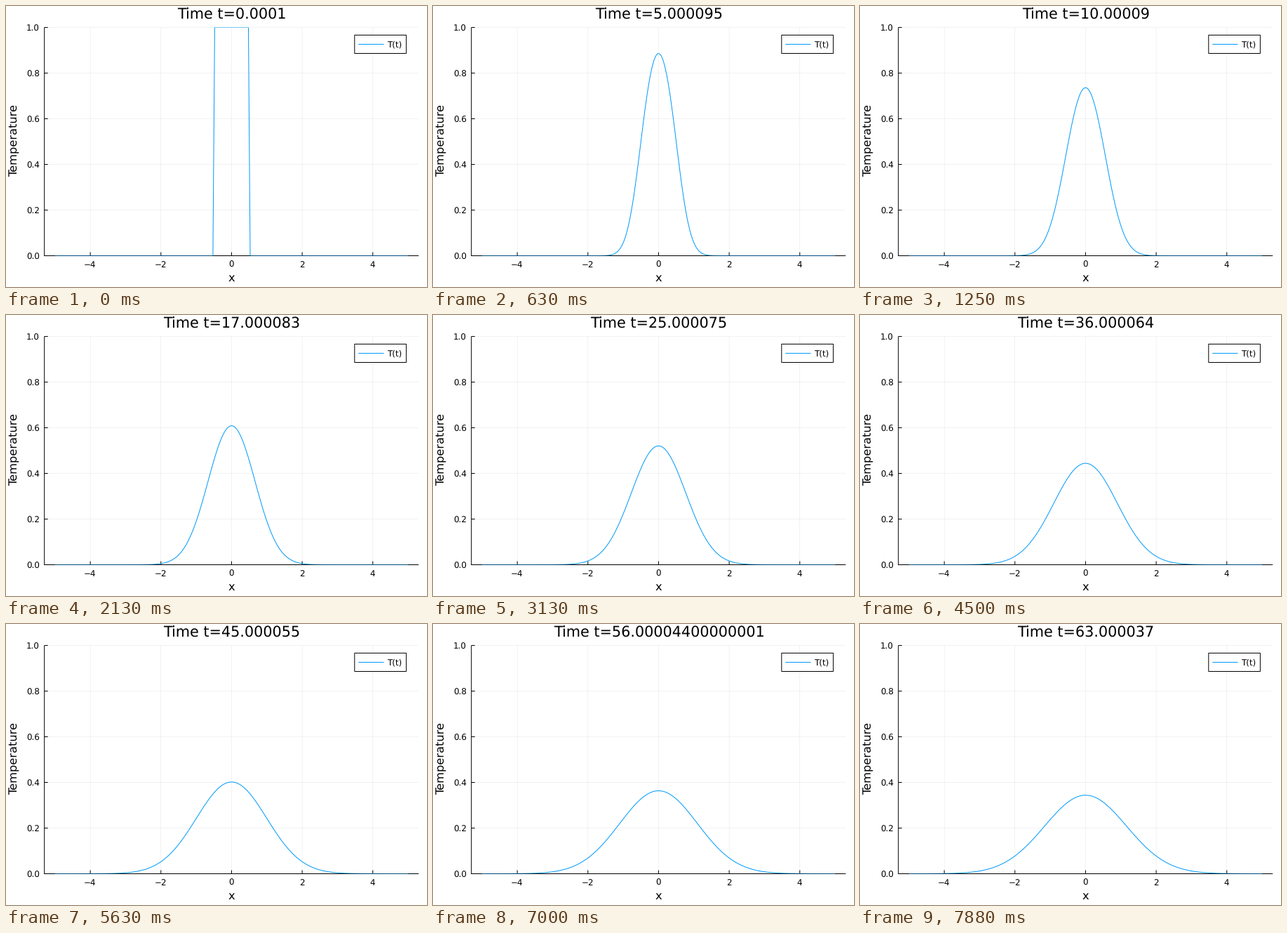
These frames come from a looping animation (600 px wide and 400 px high, 8000 ms). A matplotlib script:

```python
from math import erf, sqrt

import matplotlib.pyplot as plt
import numpy as np
from matplotlib.animation import FuncAnimation
from matplotlib.patches import Rectangle
from matplotlib.path import Path

plt.rcParams.update({
    "font.family": "DejaVu Sans",
    "text.hinting": "none",
    "path.simplify": False,
    "path.snap": False,
})

W, H, DPI = 600, 400, 100
PX = 72 / DPI                       # points per pixel
LEFT, RIGHT, TOP, BOTTOM = 54.7, 588.2, 30.5, 355.5
CENTER = (LEFT + RIGHT) / 2
UNIT = (RIGHT - LEFT) / 10.6        # pixels per unit of x
BLUE = "#009AFA"
TITLE, LABEL, SMALL = 20.75, 16.3, 11.86

DIFFUSIVITY = 0.01
T_START, T_END, STEPS = 0.0001, 100.0, 100
FRAMES, INTERVAL = 64, 125

fig = plt.figure(figsize=(W / DPI, H / DPI), dpi=DPI, facecolor="white")
ax = fig.add_axes([0, 0, 1, 1])
ax.set_xlim(0, W)
ax.set_ylim(H, 0)
ax.axis("off")


def to_x(x):
    return CENTER + UNIT * x


def to_y(v):
    return BOTTOM - (BOTTOM - TOP) * v


def line(xs, ys, color="black", z=2, width=1, **kw):
    return ax.plot(xs, ys, color=color, lw=width * PX, zorder=z, snap=False,
                   solid_capstyle="butt", **kw)[0]


def grid_line(xs, ys):
    line(xs, ys, z=1, width=0.5, alpha=0.1)


def label(x, y, text, size, ha="center", **kw):
    return ax.text(x, y, text, fontsize=size * PX, ha=ha, va="baseline",
                   color="black", zorder=6, **kw)


def draw_axes():
    for v in (-4, -2, 0, 2, 4):
        x = to_x(v)
        grid_line([x, x], [TOP, BOTTOM])
        line([x, x], [BOTTOM - 5, BOTTOM])
        label(x - 0.4, 372, str(v).replace("-", "\u2212"), SMALL)
    for i in range(6):
        y = to_y(i / 5)
        grid_line([LEFT, RIGHT], [y, y])
        line([LEFT, LEFT + 5], [y, y])
        label(48, y + 5.4, f"{i / 5:.1f}", SMALL, "right")
    line([LEFT, RIGHT], [BOTTOM, BOTTOM])
    line([LEFT, LEFT], [TOP, BOTTOM + 0.5])
    label(321.6, 392, "x", LABEL)
    label(17, 192, "Temperature", LABEL, rotation=90, rotation_mode="anchor")


def draw_legend():
    ax.add_patch(Rectangle((496.8, 41.4), 73.6, 26.1, facecolor="white",
                           edgecolor="black", lw=PX, zorder=5, snap=False))
    line([502.3, 538.5], [54.5, 54.5], BLUE, 6)
    label(543.5, 58, "T(t)", SMALL, "left")


def temperature(x, t):
    """Heat spreading from a unit block on [-0.5, 0.5]."""
    s = sqrt(4 * DIFFUSIVITY * t)
    return np.array([(erf((p + 0.5) / s) - erf((p - 0.5) / s)) / 2 for p in x])


draw_axes()
draw_legend()
grid = np.linspace(-5, 5, 200)
curve = line(to_x(grid), to_y(0 * grid), BLUE, 3)
# A path clip keeps soft edges where the curve runs along the plot border.
curve.set_clip_path(Path([(LEFT, TOP), (RIGHT, TOP), (RIGHT, BOTTOM),
                          (LEFT, BOTTOM), (LEFT, TOP)]), ax.transData)
title = label(322, 19, "", TITLE)


def update(k):
    f = k / STEPS
    t = (1 - f) * T_START + f * T_END
    curve.set_ydata(to_y(temperature(grid, t)))
    title.set_text(f"Time t={t!r}")
    return curve, title


anim = FuncAnimation(fig, update, frames=FRAMES, interval=INTERVAL,
                     repeat=True, repeat_delay=0)
plt.show()
```
